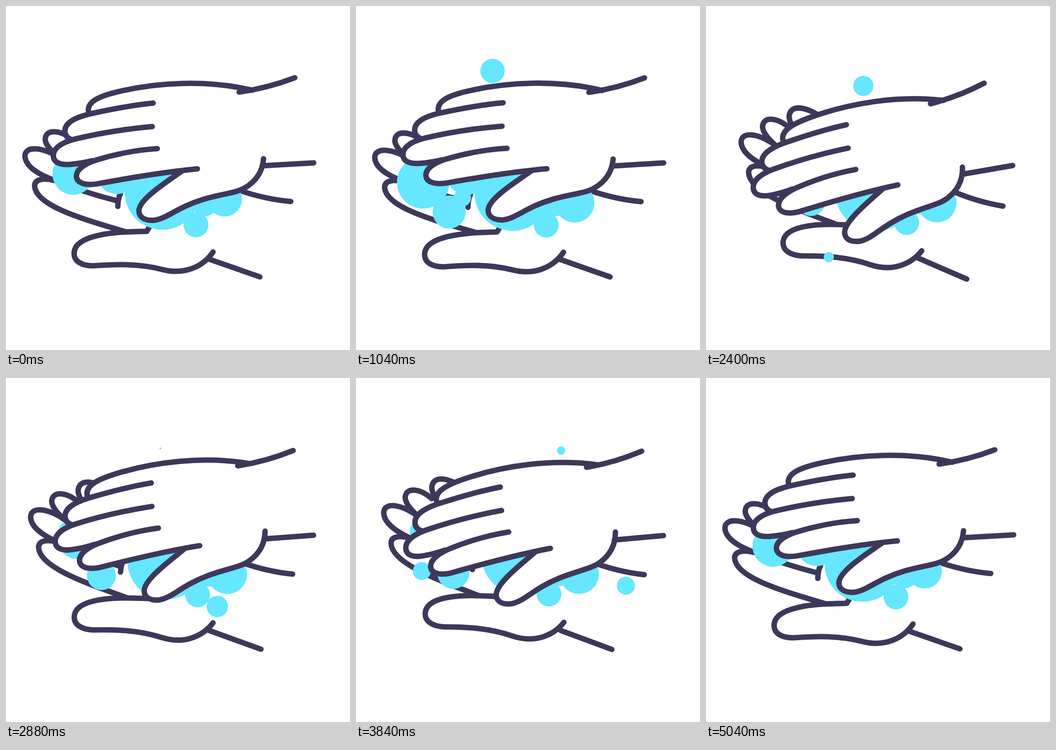
Recreate the animation shown at these times as an HTML page. Size 748x748 px, loop 5.08 s.

```html
<!DOCTYPE html>
<html lang="en">
<head>
<meta charset="utf-8">
<title>Washing hands</title>
<style>
  html, body { margin: 0; width: 100%; height: 100%; overflow: hidden; background: #fff; }
  svg { display: block; width: 100vw; height: 100vh; }
  .line path { fill: none; stroke: #3d3859; stroke-width: 11.8; stroke-linecap: round; stroke-linejoin: round; }
  .line .skin { fill: #fff; }
  circle { fill: #66e6ff; }
</style>
</head>
<body>
<svg viewBox="0 0 748 748">
  <g id="lowerArm" class="line">
    <path d="M496 397Q560 420 619 425M440 550L552 589"/>
    <g id="lowerHand">
      <path d="M202 256C172 241 141 238 141 265Q143 280 160 297"/>
      <path d="M143 289C118 270 85 266 85 291C87 306 104 320 118 331"/>
      <path d="M118 331C88 310 41 300 41 327C43 352 76 368 102 378Q170 406 243 424M249 407Q243 420 243 436"/>
      <path d="M103 379C82 374 62 376 62 392C66 436 170 464 260 491"/>
      <path d="M313 478L306 490C270 491 235 491 200 499C165 507 148 520 148 538C148 556 165 565 190 565C240 561 290 560 340 573C390 586 430 565 450 535"/>
    </g>
  </g>
  <g id="foam"></g>
  <g id="drops"></g>
  <g id="upperArm" class="line">
    <g id="upperHand">
      <polygon fill="#fff" points="535,182 350,185 180,233 142,290 188,336 300,330 400,352 480,380 560,332"/>
      <path class="skin" d="M535 183C440 160 330 165 240 187C200 197 179 208 179 226L180 233"/>
      <path class="skin" d="M382 359C350 382 289 420 289 445C289 460 303 466 320 466C350 463 370 438 430 420C470 408 500 407 520 395C545 380 558 358 560 332"/>
      <path class="skin" d="M320 211C270 216 220 226 180 235C140 245 128 258 128 272Q129 286 142 290"/>
      <path class="skin" d="M318 262C260 267 200 277 150 289C115 298 103 312 103 325C103 340 118 346 140 344Q165 342 188 336"/>
      <path class="skin" d="M329 310C280 313 230 324 195 335C165 345 153 358 153 370C154 384 170 390 195 387C260 375 340 361 416 354"/>
    </g>
    <path d="M507 187Q568 179 628 156M562 347L669 341"/>
  </g>
</svg>
<script>
const LOOP = 5080, STEP = 40, RUB = 1008, DROP_LIFE = 1160, DROP_SIZE = 26.5;
const KEY_TIMES = [0, 1040, 1800, 2400, 3360, 3840, 5040];

// Foam on the lower palm: x, y at radius 0, sag per unit of radius, radius (fixed or at each key time)
const foam = [
  { x: 146, y: 307, sag: 1.3, r: [45, 57, 47, 46, 46, 45, 45] },
  { x: 241, y: 365, sag: 0, r: 44 },
  { x: 231, y: 415, sag: 0, r: [0, 19, 0, 0, 0, 0, 0] },
  { x: 202, y: 446, sag: 0, r: [0, 36, 28, 31, 32, 35, 0] },
  { x: 273, y: 455, sag: 0, r: [0, 0, 43, 0, 0, 0, 0] },
  { x: 340, y: 298, sag: 1.3, r: [82, 82.5, 88, 88, 79, 79, 82] },
  { x: 432, y: 428, sag: 0, r: 29 },
  { x: 413, y: 476, sag: 0, r: 27 },
  { x: 475, y: 359, sag: 1.6, r: [38, 43, 43, 43, 43, 43, 38] }
];

// Loose bubbles: start time, start point, travel
const drops = [
  { start: 640, x: 310, y: 187, dx: -23, dy: -80 },
  { start: 1292, x: 200, y: 250, dx: -47, dy: -61 },
  { start: 1730, x: 274, y: 496, dx: -8.5, dy: 61 },
  { start: 1932, x: 355, y: 215, dx: -20, dy: -64 },
  { start: 2432, x: 438, y: 470, dx: 34.5, dy: 43 },
  { start: 3123, x: 484.5, y: 184, dx: -45, dy: -31 },
  { start: 3332, x: 180, y: 400, dx: -54, dy: 29 },
  { start: 3332, x: 530, y: 425, dx: 83, dy: 39 }
];

const byId = id => document.getElementById(id);
const wave = phase => Math.cos(2 * Math.PI * phase);
const clamp = v => Math.max(0, Math.min(1, v));

function addCircles(items, parent) {
  for (const item of items) {
    item.node = document.createElementNS("http://www.w3.org/2000/svg", "circle");
    parent.append(item.node);
  }
}

function place(node, x, y, r) {
  node.setAttribute("cx", x);
  node.setAttribute("cy", y);
  node.setAttribute("r", r);
}

function radiusAt(r, t) {
  if (!Array.isArray(r)) return r;
  let i = 0;
  while (i < KEY_TIMES.length - 2 && t >= KEY_TIMES[i + 1]) i++;
  const u = clamp((t - KEY_TIMES[i]) / (KEY_TIMES[i + 1] - KEY_TIMES[i]));
  return r[i] + (r[i + 1] - r[i]) * u * u * (3 - 2 * u);
}

function draw(t) {
  const phase = t / RUB;
  const arm = 3.67 * (1 - wave(phase + 0.02));
  const hand = 1.18 - 3.21 * wave(phase - 0.19);
  const lowerArm = `rotate(${0.63 * arm} 494 794)`;
  const lowerHand = `rotate(${0.92 * hand} 495 470)`;
  byId("lowerArm").setAttribute("transform", lowerArm);
  byId("lowerHand").setAttribute("transform", lowerHand);
  byId("foam").setAttribute("transform", lowerArm + lowerHand);
  byId("upperArm").setAttribute("transform", `rotate(${-arm} 718 362)`);
  byId("upperHand").setAttribute("transform", `rotate(${-hand} 525 250)`);

  for (const b of foam) {
    const r = radiusAt(b.r, t);
    place(b.node, b.x, b.y + b.sag * r, r);
  }
  for (const d of drops) {
    const u = clamp((t - d.start) / DROP_LIFE);
    const travel = 1 - (1 - u) ** 2;
    const size = Math.min(1, 5 * u, 2.33 * (1 - u) ** 2);
    place(d.node, d.x + d.dx * travel, d.y + d.dy * travel, DROP_SIZE * size);
  }
}

addCircles(foam, byId("foam"));
addCircles(drops, byId("drops"));

const begin = performance.now();
function tick() {
  const t = (performance.now() - begin) % LOOP;
  draw(Math.floor(t / STEP) * STEP);
  requestAnimationFrame(tick);
}
tick();
</script>
</body>
</html>
```
